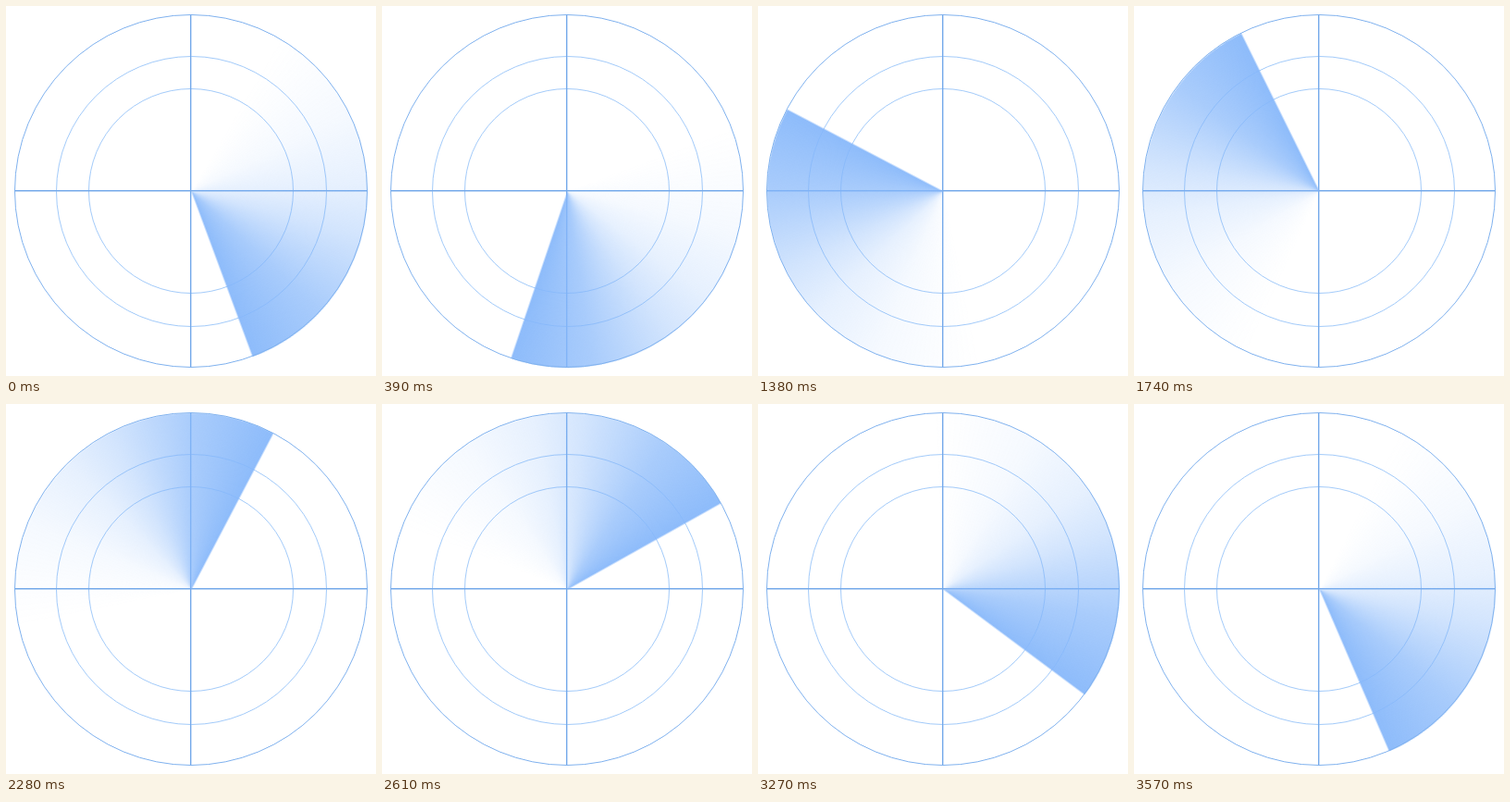
Recreate the animation shown at these times as an HTML page. Size 400x400 px, loop 3600 ms.

```html
<!DOCTYPE html>
<html lang="en">
<head>
<meta charset="utf-8">
<title>Radar sweep</title>
<style>
  html, body {
    margin: 0;
    width: 100%;
    height: 100%;
    overflow: hidden;
    background: #fff;
  }
  .radar {
    position: relative;
    width: 400px;
    height: 400px;
  }
  svg {
    position: absolute;
    inset: 0;
    fill: none;
  }
  .ring { stroke: #a3cbfa; }
  .rim { stroke: #7fb1ee; }
  .axis { stroke: #74a9ea; stroke-width: 1.4; }

  /* The leading edge points right at zero rotation; the tail fades over 130deg. */
  .sweep {
    --c: 132 182 250;
    position: absolute;
    inset: 9.5px;
    border-radius: 50%;
    background: conic-gradient(from -40deg,
      rgb(var(--c) / 0) 0deg,
      rgb(var(--c) / .02) 10deg,
      rgb(var(--c) / .08) 34deg,
      rgb(var(--c) / .2) 58deg,
      rgb(var(--c) / .36) 75deg,
      rgb(var(--c) / .7) 103deg,
      rgb(var(--c) / .92) 129.8deg,
      rgb(var(--c) / 0) 130.2deg);
    animation: turn 3.6s steps(120) infinite;
  }
  @keyframes turn {
    from { transform: rotate(69.7deg); }
    to { transform: rotate(429.7deg); }
  }
</style>
</head>
<body>
<div class="radar">
  <svg width="400" height="400" viewBox="0 0 400 400">
    <circle class="ring" cx="200" cy="200" r="110.5"/>
    <circle class="ring" cx="200.5" cy="200.5" r="146"/>
    <path class="axis" d="M9.5 199.7H390.5M199.7 9.5V390.5"/>
  </svg>
  <div class="sweep"></div>
  <svg width="400" height="400" viewBox="0 0 400 400">
    <circle class="rim" cx="200" cy="200" r="190.5"/>
  </svg>
</div>
</body>
</html>
```
